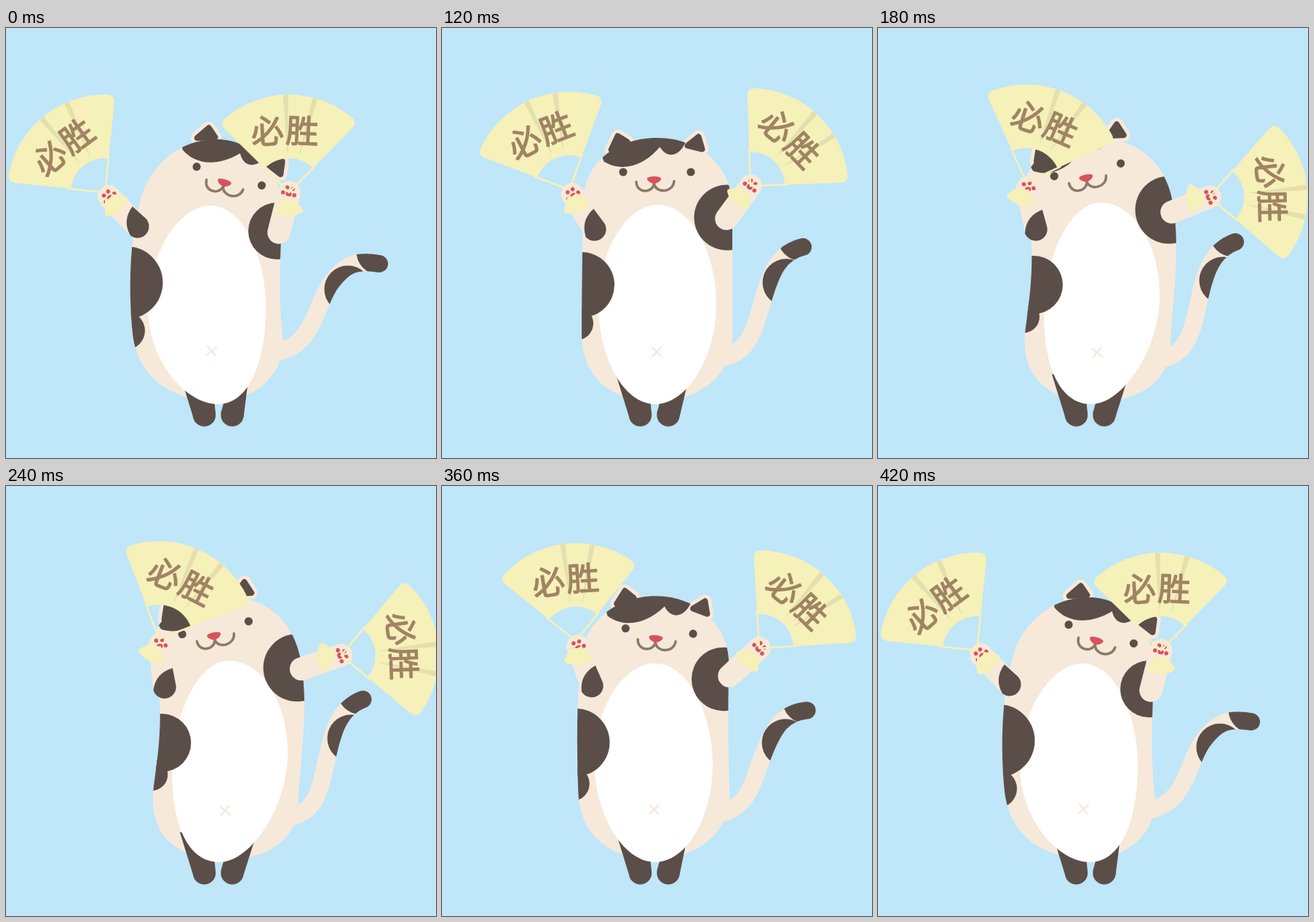
An HTML page with a canvas that plays this animation: 591x591 px, repeating every 450 ms.

```html
<!DOCTYPE html>
<html lang="zh">
<head>
<meta charset="utf-8">
<title>Cheering cat</title>
<style>
  html, body { margin: 0; width: 100%; height: 100%; overflow: hidden; background: #bfe6f9; }
  canvas { display: block; width: 100vw; height: 100vh; }
</style>
</head>
<body>
<canvas id="stage" width="591" height="591"></canvas>
<script>
const ctx = document.getElementById('stage').getContext('2d');
const CREAM = '#f6e9da', DARK = '#5b4e48', YELLOW = '#f6f0b9', FOLD = '#e4dfad';
const RED = '#d9525b', INK = '#9f8464', MOUTH = '#8d7967';
const LOOP = 450, STEP = 30, DEG = Math.PI / 180;

// Each channel lists its value at these times, then returns to the first value.
const TIMES = [0, 60, 120, 180, 300, 360, 420];
const CHANNELS = {
  lean: [0, .13, .58, 1, .76, .41],
  tail: [0, .41, .77, 1, .86, .52],
  leftX: [136, 153, 175, 204, 201, 184],
  leftY: [226, 228, 222, 212, 212, 213],
  leftTurn: [-39, -34, -24.5, 20.5, 8, -6.3],
  leftShoulderX: [181, 196, 210, 217, 214, 206],
  leftShoulderY: [273, 275, 277, 277, 276, 275],
  rightX: [389, 402, 424, 456, 450, 436],
  rightY: [226, 217, 217, 232, 227, 223],
  rightTurn: [-.5, 12, 43, 86, 62.5, 41.6],
  rightShoulderX: [375, 383, 391, 404, 401, 395],
  rightShoulderY: [281, 271, 262, 253, 255, 261]
};

function sample(list, t) {
  const v = [...list, list[0]], last = TIMES.length - 1;
  let i = 0;
  while (i < last - 1 && t >= TIMES[i + 1]) i++;
  const gap = k => TIMES[k + 1] - TIMES[k];
  const rate = k => (v[k + 1] - v[k]) / gap(k);
  const slope = k => {
    if (k === 0) return 0;
    if (k === last) return rate(k - 1);
    return (gap(k) * rate(k - 1) + gap(k - 1) * rate(k)) / (gap(k) + gap(k - 1));
  };
  const h = gap(i), u = (t - TIMES[i]) / h, w = 1 - u;
  return w * w * (1 + 2 * u) * v[i] + u * u * (3 - 2 * u) * v[i + 1]
    + h * u * w * (w * slope(i) - u * slope(i + 1));
}

const mix = (a, b, k) => a.map((v, i) => v + (b[i] - v) * k);

// Quadratic through a left-leaning, an upright and a right-leaning pose.
function pose(s, left, mid, right) {
  const m = .58;
  const a = (s - m) * (s - 1) / m, b = s * (1 - s) / (m * (1 - m)), c = s * (s - m) / (1 - m);
  return left.map((v, i) => a * v + b * mid[i] + c * right[i]);
}

function curve(p) {
  const path = new Path2D();
  path.moveTo(p[0], p[1]);
  for (let i = 2; i < p.length; i += 6) path.bezierCurveTo(...p.slice(i, i + 6));
  return path;
}

function fill(color, path) {
  ctx.fillStyle = color;
  ctx.fill(path);
}

function stroke(color, width, path) {
  ctx.strokeStyle = color;
  ctx.lineWidth = width;
  ctx.stroke(path);
}

function disc(color, x, y, rx, ry = rx) {
  const path = new Path2D();
  path.ellipse(x, y, rx, ry, 0, 0, 7);
  fill(color, path);
}

function at(x, y, angle, draw) {
  ctx.save();
  ctx.translate(x, y);
  ctx.rotate(angle);
  draw();
  ctx.restore();
}

function within(path, draw) {
  ctx.save();
  ctx.clip(path);
  draw();
  ctx.restore();
}

function drawTail(k) {
  const p = mix(
    [365, 447, 425, 440, 424, 380, 447, 350, 465, 326, 480, 318, 513, 324],
    [385, 456, 425, 450, 431, 420, 441, 375, 449, 338, 458, 306, 491, 294], k);
  stroke(CREAM, 24, curve(p));
  ctx.globalCompositeOperation = 'source-atop';
  disc(DARK, 470 + 4 * k, 359 - 12 * k, 32.5);
  disc(DARK, p[12] + 1 - 4 * k, p[13] - 17 + 5 * k, 32.5);
  ctx.globalCompositeOperation = 'source-over';
}

const bodyPath = s => curve(pose(s,
  [292, 513, 240, 513, 182, 490, 174, 420, 168, 360, 170, 290, 184, 240, 191, 205, 225, 153, 290, 153,
    335, 153, 379, 190, 379, 250, 378, 310, 373, 370, 381, 430, 381, 480, 340, 512, 292, 513],
  [292, 513, 245, 513, 192, 490, 192, 420, 192, 360, 193, 300, 194, 240, 194, 190, 235, 151, 296, 151,
    358, 151, 399, 195, 399, 245, 399, 310, 399, 370, 399, 430, 396, 480, 350, 514, 292, 513],
  [292, 513, 250, 513, 196, 490, 202, 420, 208, 370, 218, 320, 205, 240, 190, 185, 240, 152, 300, 152,
    355, 150, 398, 185, 406, 245, 416, 310, 404, 380, 402, 430, 404, 485, 360, 516, 292, 513]));

function bellyPath(s) {
  const [tx, ty, rx, ry, bx, by, lx, ly] = pose(s,
    [281, 244, 357, 385, 291, 517, 195, 385],
    [297, 243, 377, 380, 293, 517, 215, 380],
    [306, 240, 387, 368, 293, 517, 228, 392]);
  return curve([tx, ty, tx + 44, ty, rx, ry - 73, rx, ry, rx, ry + 72, bx + 44, by, bx, by,
    bx - 44, by, lx, ly + 72, lx, ly, lx, ly - 73, tx - 44, ty, tx, ty]);
}

function drawLegs(s) {
  fill(DARK, new Path2D('M239 476L257.3 535L288 530L283 476Z'));
  disc(DARK, 272.5, 532, 15.7);
  fill(DARK, new Path2D(`M${334 + 11 * s} 476L326.6 534L295.4 529L306 490Z`));
  disc(DARK, 311, 532, 15.7);
}

const EARS = [
  new Path2D('M-59 -41L-50 -60L-37 -52Z'),
  new Path2D('M46 -47L61 -59L66 -42Z')
];
const HAIR = new Path2D('M-69 -25C-50 -13 -20 -13 8 -45C18 -28 38 -30 46 -60V-95H-95Z');
const MOUTH_LINE = new Path2D('M-24.5 3C-24 19 -3 19 0 6C3 19 26 18 27.5 2');

function drawEars(color, width) {
  for (const ear of EARS) {
    fill(color, ear);
    stroke(color, width, ear);
  }
}

function drawFace() {
  disc(DARK, -42.5, -10.5, 5.6);
  disc(DARK, 50.5, -10.5, 5.6);
  stroke(MOUTH, 3.5, MOUTH_LINE);
  fill(RED, new Path2D('M0 6C-6 4 -10 1 -9.5 -2C-8 -5.5 8 -5.5 9.5 -2C10 1 6 4 0 6Z'));
}

function drawCat(s) {
  const [noseX, noseY, tilt] = pose(s, [300, 212.5, 16], [291.5, 208.5, 0], [286, 206, -10.8]);
  const body = bodyPath(s);
  const head = (gain, draw) => at(noseX, noseY, tilt * gain * DEG, draw);

  head(1.5, () => drawEars(CREAM, 18));
  fill(CREAM, body);
  within(body, () => head(1.15, () => fill(DARK, HAIR)));
  head(1.5, () => drawEars(DARK, 8));
  drawLegs(s);
  fill(CREAM, new Path2D());
  fill('#fff', bellyPath(s));
  within(body, () => {
    disc(DARK, ...pose(s, [372, 279, 39], [391.5, 260.5, 45], [400, 250, 46.5]));
    disc(DARK, ...pose(s, [165.5, 350, 50], [192, 353, 45], [214, 353, 40]));
    disc(DARK, ...pose(s, [165, 416, 26], [185, 406, 23], [200, 397, 22]));
  });
  const [navelX, navelY] = pose(s, [282.5, 444], [295, 445], [301, 446]);
  at(navelX, navelY, (5 - 10 * s) * DEG, () =>
    stroke(CREAM, 2.4, new Path2D('M-6 -6L6 6M6 -6L-6 6')));
  head(1, drawFace);
}

function drawArm(handX, handY, shoulderX, shoulderY, patched) {
  const arm = new Path2D();
  arm.moveTo(shoulderX, shoulderY);
  arm.lineTo(handX, handY);
  stroke(CREAM, 31.5, arm);
  const angle = Math.atan2(handX - shoulderX, shoulderY - handY);
  if (patched) at(shoulderX, shoulderY, angle, () =>
    fill(DARK, new Path2D('M15.8 0L14 -25Q-10 -21 -15.8 2A15.9 15.9 0 0 0 15.8 0Z')));
  at(handX, handY, angle, () => {
    disc(RED, 0, 2, 4.2, 3.4);
    for (const [x, y] of [[-8, 2], [-4, -6], [4, -6], [8, 2]]) disc(RED, x, y, 2.8);
  });
}

// Ring sector pointing up, with softened outer corners.
function sector(inner, outer, half, round) {
  const polar = (r, a) => [r * Math.sin(a), -r * Math.cos(a)];
  const up = -Math.PI / 2, cut = half - round / outer;
  const path = new Path2D();
  path.moveTo(...polar(inner, -half));
  path.lineTo(...polar(outer - round, -half));
  path.quadraticCurveTo(...polar(outer, -half), ...polar(outer, -cut));
  path.arc(0, 0, outer, up - cut, up + cut);
  path.quadraticCurveTo(...polar(outer, half), ...polar(outer - round, half));
  path.lineTo(...polar(inner, half));
  path.arc(0, 0, inner, up + half, up - half, true);
  path.closePath();
  return path;
}

const LEAF = sector(47, 134.5, 45 * DEG, 11);
const HANDLE = sector(10, 33, 39 * DEG, 4);
const RODS = new Path2D('M-36 -36L0 0L36 -36');
const PLEAT = new Path2D('M-3.6 -134L3.6 -134L.5 -55L-.5 -55Z');

function drawGlyph(glyph, x, y, angle) {
  at(x, y, angle * DEG, () => {
    ctx.fillText(glyph, 0, 0);
    ctx.strokeText(glyph, 0, 0);
  });
}

function drawFan(x, y, turn) {
  at(x, y, turn * DEG, () => {
    stroke(YELLOW, 2.6, RODS);
    fill(YELLOW, LEAF);
    at(0, 0, Math.PI, () => fill(YELLOW, HANDLE));
    for (const a of [-1.5, 16]) at(0, 0, a * DEG, () => fill(FOLD, PLEAT));
    ctx.font = '500 45px "Noto Sans CJK SC", "Noto Sans CJK", "Noto Sans CJK JP", sans-serif';
    ctx.textAlign = 'center';
    ctx.textBaseline = 'middle';
    ctx.fillStyle = ctx.strokeStyle = INK;
    ctx.lineWidth = 1.4;
    drawGlyph('必', -29, -85, -3);
    drawGlyph('胜', 19, -85, 3);
  });
}

function draw(t) {
  const p = {};
  for (const name in CHANNELS) p[name] = sample(CHANNELS[name], t);
  ctx.clearRect(0, 0, 591, 591);
  ctx.lineCap = ctx.lineJoin = 'round';
  drawTail(p.tail);
  drawCat(p.lean);

  const dx = p.leftShoulderX - p.leftX, dy = p.leftShoulderY - p.leftY;
  const reach = 8 / Math.hypot(dx, dy);
  drawArm(p.leftX + dx * reach, p.leftY + dy * reach, p.leftShoulderX, p.leftShoulderY, true);
  drawArm(p.rightX, p.rightY, p.rightShoulderX, p.rightShoulderY, false);
  drawFan(p.leftX, p.leftY, p.leftTurn);
  drawFan(p.rightX, p.rightY, p.rightTurn);
}

const start = performance.now();
function tick() {
  const t = (performance.now() - start) % LOOP;
  draw(Math.min(420, Math.floor(t / STEP) * STEP));
  requestAnimationFrame(tick);
}
tick();
</script>
</body>
</html>
```
